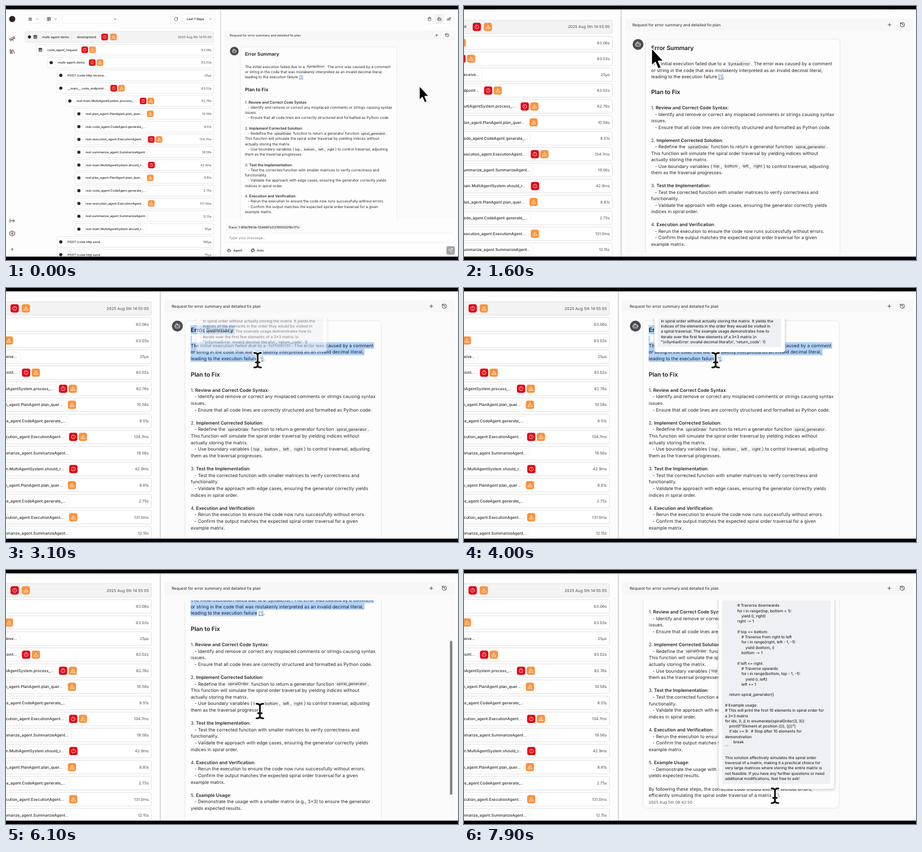
An HTML page for the animation above (8000 ms loop, 800 by 450 pixels).

```html
<!DOCTYPE html>
<html lang="en">
<head>
<meta charset="utf-8">
<title>Trace explorer with fix plan</title>
<style>
  html, body { margin: 0; width: 100%; height: 100%; overflow: hidden; background: #000; }
  svg { display: block; width: 100vw; height: 100vh; }
  text { font-family: Inter, "Open Sans", sans-serif; white-space: pre; text-rendering: geometricPrecision; }
  .icon { fill: none; stroke-linecap: round; stroke-linejoin: round; }
  .selection { fill: #b3d5fd; mix-blend-mode: multiply; }
  .raised { filter: drop-shadow(0 1px 2px rgba(0, 0, 0, .22)); }
</style>
</head>
<body>
<svg id="stage" viewBox="0 0 800 450"></svg>
<script>
const LOOP = 8000;
const INK = '#27272a';
const BODY = 6.46, SMALL = 5.5, LINE = 9.25;

const el = (parent, tag, attrs = {}) => {
  const node = document.createElementNS('http://www.w3.org/2000/svg', tag);
  for (const key in attrs) node.setAttribute(key, attrs[key]);
  return parent.appendChild(node);
};
const group = (parent, attrs) => el(parent, 'g', attrs);
const rect = (parent, x, y, width, height, attrs) => el(parent, 'rect', { x, y, width, height, ...attrs });
const box = (parent, x, y, w, h, attrs) =>
  rect(parent, x, y, w, h, { rx: 3, fill: '#fff', stroke: '#e6e6e8', 'stroke-width': .6, ...attrs });

// Text is placed by its vertical middle; the result is its advance width.
const text = (parent, str, x, middle, size = SMALL, attrs = {}) => {
  const node = el(parent, 'text', { x, y: middle + size * .36, 'font-size': size, fill: INK, ...attrs });
  node.textContent = str;
  return node.getComputedTextLength();
};

const ICONS = {
  chevron: 'M6 9l6 6 6-6',
  close: 'M18 6 6 18M6 6l12 12',
  plus: 'M5 12h14M12 5v14',
  grid: 'M4 4h6v6H4zM14 4h6v6h-6zM4 14h6v6H4zM14 14h6v6h-6z',
  table: 'M4 3h16v18H4zM4 8h16M4 5.5h16M10 8v13M4 14h16',
  refresh: 'M21 12a9 9 0 1 1-9-9c2.5 0 4.9 1 6.7 2.7L21 8M21 3v5h-5',
  history: 'M3 12a9 9 0 1 0 9-9 9.8 9.8 0 0 0-6.7 2.7L3 8M3 3v5h5M12 7v5l4 2',
  bot: 'M12 8V4H8M6 8h12a2 2 0 0 1 2 2v8a2 2 0 0 1-2 2H6a2 2 0 0 1-2-2v-8a2 2 0 0 1 2-2zM2 14h2M20 14h2M15 13v2M9 13v2',
  scope: 'M2 13l13-7 3 6-14 5zM15 6l4-3 4 8-5 1M10 15l-4 7M12 14l5 8',
  books: 'M16 6l5 14M12 5v16M8 7v14M4 3v18',
  expand: 'M3 5v14M21 12H7M15 18l6-6-6-6',
  gear: 'M12 9a3 3 0 1 0 0 6a3 3 0 1 0 0-6M10 2h4l1 3 3 1 3-1 2 4-2 3 2 3-2 4-3-1-3 1-1 3h-4l-1-3-3-1-3 1-2-4 2-3-2-3 2-4 3 1 3-1z',
  file: 'M7 3h8l4 4v14H5v-9M14 3v5h5M3 8h8M8 5l3 3-3 3',
  send: 'M22 2 11 13M22 2l-7 20-4-9-9-4z',
  error: 'M12 3a9 9 0 1 0 0 18a9 9 0 1 0 0-18M12 8v4M12 16v.1',
  warning: 'M12 4 2.5 20h19zM12 10v4M12 17v.1',
  palette: 'M12 3a9 9 0 1 0 0 18c3 0 1-4 3-5s6 1 6-4a9 9 0 0 0-9-9zM8 9v.1M13 7v.1M17 10v.1M7 14v.1'
};
const icon = (parent, name, x, y, size, stroke = INK, weight = 2) =>
  el(parent, 'path', {
    class: 'icon', d: ICONS[name], stroke, 'stroke-width': weight,
    transform: `translate(${x - size / 2} ${y - size / 2}) scale(${size / 24})`
  });

// Motion: each entry of motions draws one part for a given time.
const EASE = {
  linear: u => u,
  in: u => u * u,
  out: u => u * (2 - u),
  inOut: u => u * u * (3 - 2 * u)
};
const motions = [];
const sample = (steps, time) => {
  const next = steps.findIndex(step => step[0] > time);
  if (next === 0) return steps[0][1];
  if (next < 0) return steps[steps.length - 1][1];
  const [t0, from, ease = 'linear'] = steps[next - 1];
  const [t1, to] = steps[next];
  const u = EASE[ease]((time - t0) / (t1 - t0));
  return from.map((value, i) => value + (to[i] - value) * u);
};
const ramp = (time, start, length) => Math.min(1, Math.max(0, (time - start) / length));
const showBetween = (node, from, to, fade = 1) =>
  motions.push(t => node.setAttribute('opacity', ramp(t, from, fade) - ramp(t, to, fade)));

const stage = document.getElementById('stage');
const chatClip = el(el(stage, 'defs'), 'clipPath', { id: 'chat' });
rect(chatClip, 386, 69.8, 412, 307.2);

const scene = group(stage);
rect(scene, 0, 0, 800, 450, { fill: '#fdfdfd' });

// Navigation rail
el(scene, 'circle', { cx: 11, cy: 23, r: 5.5, fill: INK });
[['scope', 58], ['books', 80.5], ['expand', 380.5], ['gear', 403]].forEach(([name, y]) => icon(scene, name, 11, y, 10.5));
text(scene, 'X', 11, 431.5, SMALL, { 'text-anchor': 'middle', 'font-weight': 600 });

// Trace toolbar
box(scene, 35, 15.5, 28, 15);
icon(scene, 'grid', 43, 23.2, 7);
icon(scene, 'chevron', 55, 23.2, 6.5);
box(scene, 68.5, 15.5, 26.5, 15);
icon(scene, 'table', 76, 23.2, 7.5);
icon(scene, 'chevron', 88, 23.2, 6.5);
box(scene, 99, 15.5, 101, 15);
icon(scene, 'close', 193, 23.2, 6);
box(scene, 291, 14.5, 20, 17);
icon(scene, 'refresh', 301, 23.2, 7.5);
box(scene, 314, 14.5, 54, 17);
text(scene, 'Last 7 Days', 320, 23.2, SMALL, { 'font-weight': 600 });
icon(scene, 'chevron', 362, 23.2, 6.5);

// Trace rows: text x, label, duration, badges
const ROWS = [
  [64, 'multi-agent-demo', '2025 Aug 5th 14:55:05', 'ew'],
  [73, 'code_agent_request', '63.06s', 'ew'],
  [92, 'multi-agent-demo', '63.03s', 'ew'],
  [109, 'POST /code http receive...', '25µs', ''],
  [109, '__main__.code_endpoint...', '63.02s', 'ew'],
  [125, 'rest.main.MultiAgentSystem.process_...', '62.76s', 'ew'],
  [141, 'rest.plan_agent.PlanAgent.plan_quer...', '10.58s', 'w'],
  [141, 'rest.code_agent.CodeAgent.generate_...', '8.51s', ''],
  [141, 'rest.execution_agent.ExecutionAgent...', '134.7ms', 'ew'],
  [141, 'rest.summarize_agent.SummarizeAgent...', '19.56s', ''],
  [141, 'rest.main.MultiAgentSystem.should_r...', '42.9ms', 'e'],
  [141, 'rest.plan_agent.PlanAgent.plan_quer...', '8.81s', 'w'],
  [141, 'rest.code_agent.CodeAgent.generate_...', '2.75s', ''],
  [141, 'rest.execution_agent.ExecutionAgent...', '131.0ms', 'w'],
  [141, 'rest.summarize_agent.SummarizeAgent...', '12.15s', ''],
  [141, 'rest.main.MultiAgentSystem.should_r...', '61µs', ''],
  [109, 'POST /code http send', '196µs', ''],
  [109, 'POST /code http send', '75µs', '']
];
const badge = (kind, x, y) => {
  rect(scene, x - 5.8, y - 5.8, 11.6, 11.6, { rx: 3, fill: kind === 'e' ? '#e2000f' : '#fb923c' });
  icon(scene, kind === 'e' ? 'error' : 'warning', x, y, 7.4, '#fff');
};
ROWS.forEach(([x, label, duration, badges], i) => {
  const y = 54.85 + 22.69 * i;
  const root = i === 0;
  const left = root ? 34 : x - 19;
  box(scene, left, y - 9.5, 367.5 - left, 19, { rx: 2, fill: root ? '#f3f3f4' : '#fff', stroke: '#d9d9dc' });
  if (i !== 1) el(scene, 'circle', { cx: root ? 41.5 : x - 12, cy: y, r: 2.8, fill: INK });
  if (i < 2) icon(scene, 'table', x - 12, y, 7.5, INK, 2.6);
  const pill = box(scene, x - 4, y - 6, 0, 12, { stroke: '#ececee', fill: 'none' });
  let end = x + text(scene, label, x, y, SMALL, { 'font-weight': 500 });
  pill.setAttribute('width', end - x + 8);
  if (root) end = 126 + text(scene, 'development', 125.5, y, SMALL, { 'font-weight': 500 }) + 1.3;
  [...badges].forEach((kind, k) => badge(kind, end + 13 + k * (root ? 15.7 : 13.7), y));
  text(scene, duration, 363.8, y, 5.55, { 'text-anchor': 'end', fill: '#4b4b52' });
});

// Chat panel
rect(scene, 379.2, 0, 1.6, 450, { fill: '#d6d6d9' });
rect(scene, 386, 43, 410, 334, { fill: '#fafafa' });
rect(scene, 386, 43, 410, 17.5, { fill: '#f7f7f8' });
box(scene, 740.5, 14.5, 52.5, 17);
rect(scene, 759, 15, 16, 16, { rx: 3, fill: '#f1f1f3' });
icon(scene, 'file', 749.5, 23, 8);
icon(scene, 'bot', 767, 23, 8);
icon(scene, 'scope', 784, 23, 8);
text(scene, 'Request for error summary and detailed fix plan', 396, 52, 5.52, { 'font-weight': 500, fill: '#3f3f46' });
icon(scene, 'plus', 762.3, 51.8, 7.5);
icon(scene, 'history', 780.8, 51.8, 8);

const view = group(scene, { 'clip-path': 'url(#chat)' });
const content = group(view);
el(content, 'circle', { cx: 404.1, cy: 79.9, r: 7.7, fill: '#4a4a50' });
icon(content, 'bot', 404.1, 79.5, 9, '#fff');
box(content, 414.8, 72.3, 277, 375.2, { rx: 5, fill: '#fdfdfd', stroke: '#dfdfe3' });

const TEXT_X = 422.9;
const chip = (x, y, str) => {
  const back = rect(content, x, y - 4.2, 0, 8.4, { rx: 1.6, fill: '#f2f2f4' });
  const width = text(content, str, x + 1.85, y, 5.55) + 3.7;
  back.setAttribute('width', width);
  return width;
};
const link = (x, y, str) =>
  text(content, str, x, y, BODY, { fill: '#24609c', 'text-decoration': 'underline' });
const richLine = (line, y) => {
  let x = TEXT_X;
  for (const part of line.split(/(`[^`]+`|\*\*[^*]+\*\*|\[\d\])/).filter(Boolean)) {
    if (part[0] === '`') x += chip(x, y, part.slice(1, -1));
    else if (part.startsWith('**')) x += text(content, part.slice(2, -2), x, y, BODY, { 'font-weight': 600 });
    else if (part[0] === '[') x += link(x, y, part);
    else x += text(content, part, x, y, BODY);
  }
};
const richText = (lines, y) => lines.split('\n').forEach((line, i) => richLine(line, y + i * LINE));
const heading = (str, y) => text(content, str, TEXT_X, y, 8.3, { 'font-weight': 600, fill: '#18181b' });

heading('Error Summary', 85);
richText(`The initial execution failed due to a \`SyntaxError\`. The error was caused by a comment
or string in the code that was mistakenly interpreted as an invalid decimal literal,
leading to the execution failure [1].`, 107.3);
heading('Plan to Fix', 148);
richText(`1. **Review and Correct Code Syntax**:
   - Identify and remove or correct any misplaced comments or strings causing syntax
issues.
   - Ensure that all code lines are correctly structured and formatted as Python code.

2. **Implement Corrected Solution**:
   - Redefine the \`spiralOrder\` function to return a generator function \`spiral_generator\`.
This function will simulate the spiral order traversal by yielding indices without
actually storing the matrix.
   - Use boundary variables (\`top\`, \`bottom\`, \`left\`, \`right\`) to control traversal, adjusting
them as the traversal progresses.

3. **Test the Implementation**:
   - Test the corrected function with smaller matrices to verify correctness and
functionality.
   - Validate the approach with edge cases, ensuring the generator correctly yields
indices in spiral order.

4. **Execution and Verification**:
   - Rerun the execution to ensure the code now runs successfully without errors.
   - Confirm the output matches the expected spiral order traversal for a given
example matrix.

5. **Example Usage**:
   - Demonstrate the usage with a smaller matrix (e.g., 3×3) to ensure the generator
yields expected results.

By following these steps, the corrected code should execute without errors,
efficiently simulating the spiral order traversal of a matrix [2].`, 170.3);
text(content, '2025 Aug 5th 08:42:50', TEXT_X, 439.3, 5.6, { fill: '#5b5b63' });

// Selection: y, height, then [time, width] steps
[
  [78.7, 12.8, [1680, 0], [1780, 12], [1800, 62.5]],
  [93.2, 9.4, [1840, 0], [1850, 2]],
  [102.7, LINE, [1880, 0], [1890, 28], [2000, 45], [2010, 259]],
  [111.9, LINE, [2010, 0], [2020, 50], [2100, 60], [2110, 245.5]],
  [121.2, LINE, [2110, 0], [2120, 62], [2200, 69.5], [2450, 94]]
].forEach(([y, height, ...widths]) => {
  const mark = rect(content, TEXT_X - .2, y, 0, height, { class: 'selection' });
  const steps = widths.map(([time, width]) => [time, [width]]);
  motions.push(t => mark.setAttribute('width', sample(steps, t)[0]));
});

const SCROLL = [[5820, [0], 'inOut'], [6415, [85]]];
const thumb = rect(view, 788.6, 98.5, 3.4, 217.5, { rx: 1.7, fill: '#828286' });
motions.push(t => {
  const [distance] = sample(SCROLL, t);
  content.setAttribute('transform', `translate(0 ${-distance})`);
  thumb.setAttribute('transform', `translate(0 ${distance * .707})`);
});
showBetween(thumb, 5780, 6360, 30);

// Citation pop-ups
const tooltip = (x, right, bottom, firstLine, pitch, lines) => {
  const tip = group(view);
  box(tip, x, 40, right - x, bottom - 40, { class: 'raised' });
  rect(tip, x + 4.6, 44, right - x - 9.8, bottom - 51.1, { rx: 2, fill: '#eff0f5' });
  lines.split('\n').forEach((line, i) =>
    text(tip, line, x + 9, firstLine + i * pitch, 5.45, { 'font-weight': 500 }));
  return tip;
};
showBetween(tooltip(431, 615, 116.5, 72.5, 7.41, String.raw`in spiral order without actually storing the matrix. It yields the
indices of the elements in the order they would be visited in
a spiral traversal. The example usage demonstrates how to
iterate over the first few elements of a 3×3 matrix.\n
"\nSyntaxError: invalid decimal literal\n', 'return_code': 1}`), 3050, 4600, 100);
showBetween(tooltip(521.5, 684.7, 335.3, 76.3, 7.405, `            # Traverse downwards
            for i in range(top, bottom + 1):
                yield (i, right)
            right -= 1

            if top <= bottom:
                # Traverse from right to left
                for i in range(right, left - 1, -1):
                    yield (bottom, i)
                bottom -= 1

            if left <= right:
                # Traverse upwards
                for i in range(bottom, top - 1, -1):
                    yield (i, left)
                left += 1

    return spiral_generator()

# Example usage:
# This will print the first 10 elements in spiral order for
a 3×3 matrix
for idx, (i, j) in enumerate(spiralOrder(3, 3)):
    print(f"Element at position ({i}, {j})")
    if idx >= 9:  # Stop after 10 elements for
demonstration
        break
\`\`\`

This solution effectively simulates the spiral order
traversal of a matrix, making it a practical choice for
very large matrices where storing the entire matrix is
not feasible. If you have any further questions or need
additional modifications, feel free to ask!`), 7380, LOOP, 100);

// Message composer
rect(scene, 390, 387, 135, 10.5, { rx: 2, fill: '#f4f4f5' });
text(scene, 'Trace: 1-80b7663b-f2d4601c5376f2422f9c171c', 393.5, 392, SMALL, { 'font-weight': 500 });
box(scene, 387, 402.5, 407, 16);
text(scene, 'Type your message...', 394.5, 410.4, BODY, { fill: '#7a7a82' });
icon(scene, 'bot', 395, 433, 7.5);
text(scene, 'Agent', 402.5, 433, SMALL, { 'font-weight': 500 });
icon(scene, 'palette', 437, 433, 7.5, INK, 3);
text(scene, 'Auto', 444, 433, SMALL, { 'font-weight': 500 });
rect(scene, 779.5, 425.5, 15, 15, { rx: 3, fill: '#a3a3a8' });
icon(scene, 'send', 786.8, 433, 8, '#fff');

// Pointer
const pointer = group(scene);
const arrow = el(pointer, 'path', {
  d: 'M.6 .6V25.5L6 20.6 10 30 14.2 28.2 10.2 19H17.6Z',
  fill: '#000', stroke: '#fff', 'stroke-width': 1.3, 'stroke-linejoin': 'round'
});
const beam = group(pointer);
[['#fff', 5], ['#111', 2.4]].forEach(([stroke, width]) => el(beam, 'path', {
  class: 'icon', stroke, 'stroke-width': width,
  d: 'M-4.8-10.3Q0-10.3 0-7V7Q0 10.3-4.8 10.3M4.8-10.3Q0-10.3 0-7M4.8 10.3Q0 10.3 0 7M-2.6 3H2.6'
}));
showBetween(arrow, -1, 1680);
showBetween(beam, 1680, LOOP);
const POINTER_PATH = [
  [300, [731, 141], 'inOut'], [1450, [422.8, 84.6]], [1650, [422.8, 84.6], 'in'],
  [2200, [491.8, 124.1], 'out'], [2450, [516, 125.5]], [3000, [517.3, 128]], [4500, [517.3, 128], 'inOut'],
  [5200, [526.9, 153.6]], [5500, [526.9, 153.6], 'inOut'], [6050, [520.5, 225.3]],
  [6450, [520.5, 225.3], 'inOut'], [7300, [601, 344.9]]
];
motions.push(t => pointer.setAttribute('transform', `translate(${sample(POINTER_PATH, t)})`));

// Camera: a critically damped zoom towards the chat
motions.push(t => {
  const phase = Math.max(0, t - 1000) * .00805;
  const scale = 1 + .2545 * (1 - (1 + phase) * Math.exp(-phase));
  scene.setAttribute('transform', `translate(800 128.5) scale(${scale}) translate(-800 -128.5)`);
});

rect(stage, 0, 0, 800, 6, { fill: '#000' });
rect(stage, 0, 444, 800, 6, { fill: '#000' });

const start = performance.now();
const render = () => {
  const time = (performance.now() - start) % LOOP;
  motions.forEach(draw => draw(time));
  requestAnimationFrame(render);
};
render();
</script>
</body>
</html>
```
